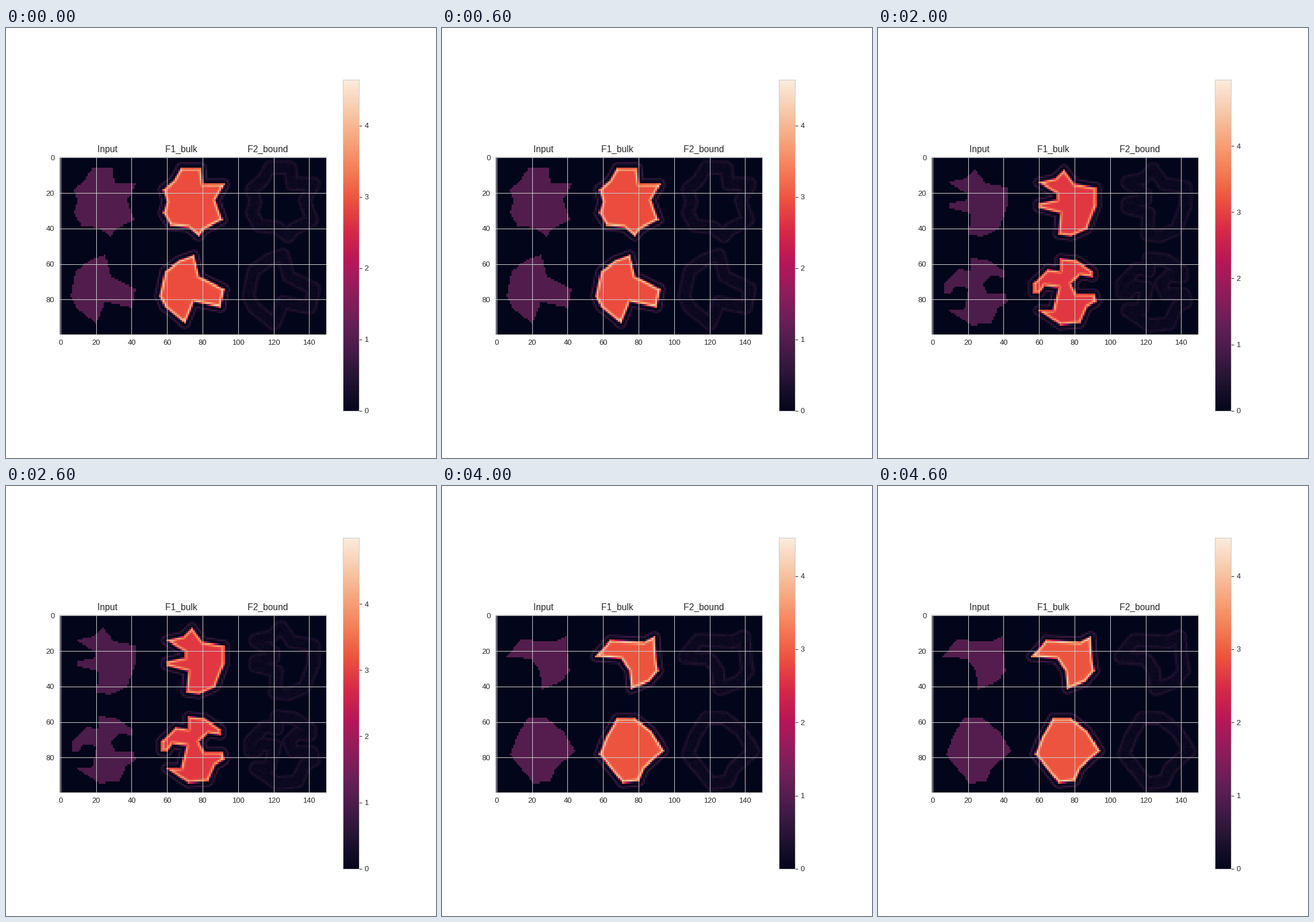
These frames come from a looping animation (748 by 748 pixels, 5 s). A matplotlib script:

```python
import numpy as np
import matplotlib.pyplot as plt
from matplotlib.animation import FuncAnimation
from matplotlib.colors import LinearSegmentedColormap
from matplotlib.path import Path

INK, LINE = "0.15", "0.8"
plt.rcParams.update({
    "font.family": "Liberation Sans", "font.size": 10,
    "text.color": INK, "xtick.color": INK, "ytick.color": INK,
    "axes.edgecolor": LINE, "grid.color": LINE, "axes.axisbelow": True,
    "xtick.bottom": False, "ytick.left": False,
})

CMAP = LinearSegmentedColormap.from_list("ember", (
    "#03051A #221331 #451C47 #6A1F56 #921C5B #B91657 "
    "#D92847 #ED513E #F47C56 #F6A47B #F7C9AA #FAEBDD").split())

# Corners of the blobs, in grid cells
star = [(18, 6), (29, 6), (30, 15), (42, 15), (37, 24), (41, 35), (31, 40),
        (28, 44), (22, 39), (12, 38), (8, 31), (10, 25), (8, 18), (14, 13)]
wing = [(25, 55), (28, 67), (42, 74), (40, 84), (25, 81), (20, 93), (9, 84),
        (6, 78), (9, 64), (17, 58)]
claw = [(12, 9), (21, 10), (32, 7), (34, 13), (42, 18), (42, 31), (40, 32),
        (38, 27), (28, 25), (24, 28), (25, 34), (32, 37), (32, 42), (20, 43),
        (11, 36), (10, 29), (8, 24), (11, 18)]
disc = [(24, 55), (35, 58), (42, 71), (38, 74), (37, 89), (19, 89), (8, 79),
        (8, 68), (17, 59)]
hand = [(24, 7), (30, 15), (42, 17), (42, 27), (37, 40), (28, 44), (21, 43),
        (22, 31), (10, 28), (10, 26), (20, 24), (20, 20), (10, 14), (19, 12)]
crab = [(22, 57), (31, 58), (40, 64), (40, 67), (33, 66), (28, 71), (31, 77),
        (41, 77), (42, 81), (37, 84), (33, 93), (22, 94), (10, 86), (18, 86),
        (21, 73), (13, 72), (10, 76), (7, 76), (7, 71), (15, 63), (22, 64)]
rock = [(18, 7), (35, 7), (36, 15), (42, 22), (40, 28), (40, 36), (33, 41),
        (27, 37), (17, 38), (7, 31), (11, 25), (10, 15)]
boot = [(31, 60), (36, 60), (36, 71), (39, 82), (33, 93), (22, 93), (8, 76),
        (11, 67), (27, 68)]
hook = [(39, 12), (40, 26), (41, 31), (36, 37), (26, 41), (25, 31), (20, 24),
        (6, 23), (14, 14), (33, 15)]
gem = [(18, 58), (28, 58), (37, 65), (44, 76), (33, 86), (30, 93), (21, 94),
       (8, 78), (12, 68)]

# Each scene: upper blob, lower blob, top of the colour scale
SCENES = [(star, wing, 4.637), (claw, disc, 5.11), (hand, crab, 4.995),
          (rock, boot, 4.463), (hook, gem, 4.52)]

ROWS, COLS = 100, 50
yy, xx = np.mgrid[:ROWS, :COLS]
CELLS = np.column_stack([xx.ravel(), yy.ravel()]).astype(float)


def blur_matrix(n, sigma):
    i = np.arange(n)
    k = np.exp(-0.5 * ((i[:, None] - i) / sigma) ** 2)
    return k / k[n // 2].sum()


def blur(a, sigma):
    return blur_matrix(ROWS, sigma) @ a @ blur_matrix(COLS, sigma)


def depth(poly):
    """Distance to the outline, positive inside."""
    pts = np.array(poly, float)
    dist = np.full(len(CELLS), np.inf)
    for a, b in zip(pts, np.roll(pts, -1, axis=0)):
        ab = b - a
        t = np.clip((CELLS - a) @ ab / (ab @ ab), 0, 1)
        dist = np.minimum(dist, np.hypot(*(CELLS - a - t[:, None] * ab).T))
    inside = Path(poly + poly[:1]).contains_points(CELLS)
    # Cells whose centre lies on the outline belong to the blob
    return np.where(inside, dist, -dist).reshape(ROWS, COLS) + 0.35


def bump(x, centre, width):
    return np.exp(-((x - centre) / width) ** 2)


def panel(upper, lower):
    d = np.maximum(depth(upper), depth(lower))
    mask = (d > 0).astype(float)
    # Bright rim, strongest at corners, with a faint halo outside
    rim = (2.6 - 2 * blur(mask, 1.4)) * bump(d, 1, 0.65)
    bulk = 2.9 / (1 + np.exp(-6 * d)) + rim * mask + 0.7 * bump(d, -2.3, 0.6)
    grain = np.random.default_rng(3).random(d.shape)
    bound = 0.3 * bump(np.abs(d), 3.4, 0.8)
    bound += (0.06 + 0.12 * grain) * (np.abs(d) < 3.4)
    return np.hstack([mask, bulk, bound])


PANELS = [panel(up, low) for up, low, _ in SCENES]

fig, ax = plt.subplots(figsize=(8, 8), dpi=93.5)
k = 747.2 / 748  # the layout is a touch smaller than the canvas
fig.subplots_adjust(left=0.125 * k, right=0.9 * k, bottom=0.11 * k, top=0.88 * k)
im = ax.imshow(PANELS[0], cmap=CMAP, vmin=0, vmax=SCENES[0][2],
               interpolation="nearest")
ax.set_xticks(range(0, 150, 20))
ax.set_yticks(range(0, 100, 20))
ax.grid(True)
ax.set_title("Input" + " " * 19 + "F1_bulk" + " " * 20 + "F2_bound")
fig.colorbar(im, ax=ax)


def update(i):
    im.set_data(PANELS[i])
    im.set_clim(0, SCENES[i][2])
    return [im]


anim = FuncAnimation(fig, update, frames=len(SCENES), interval=1000,
                     repeat=True, repeat_delay=0, blit=False)
plt.show()
```
